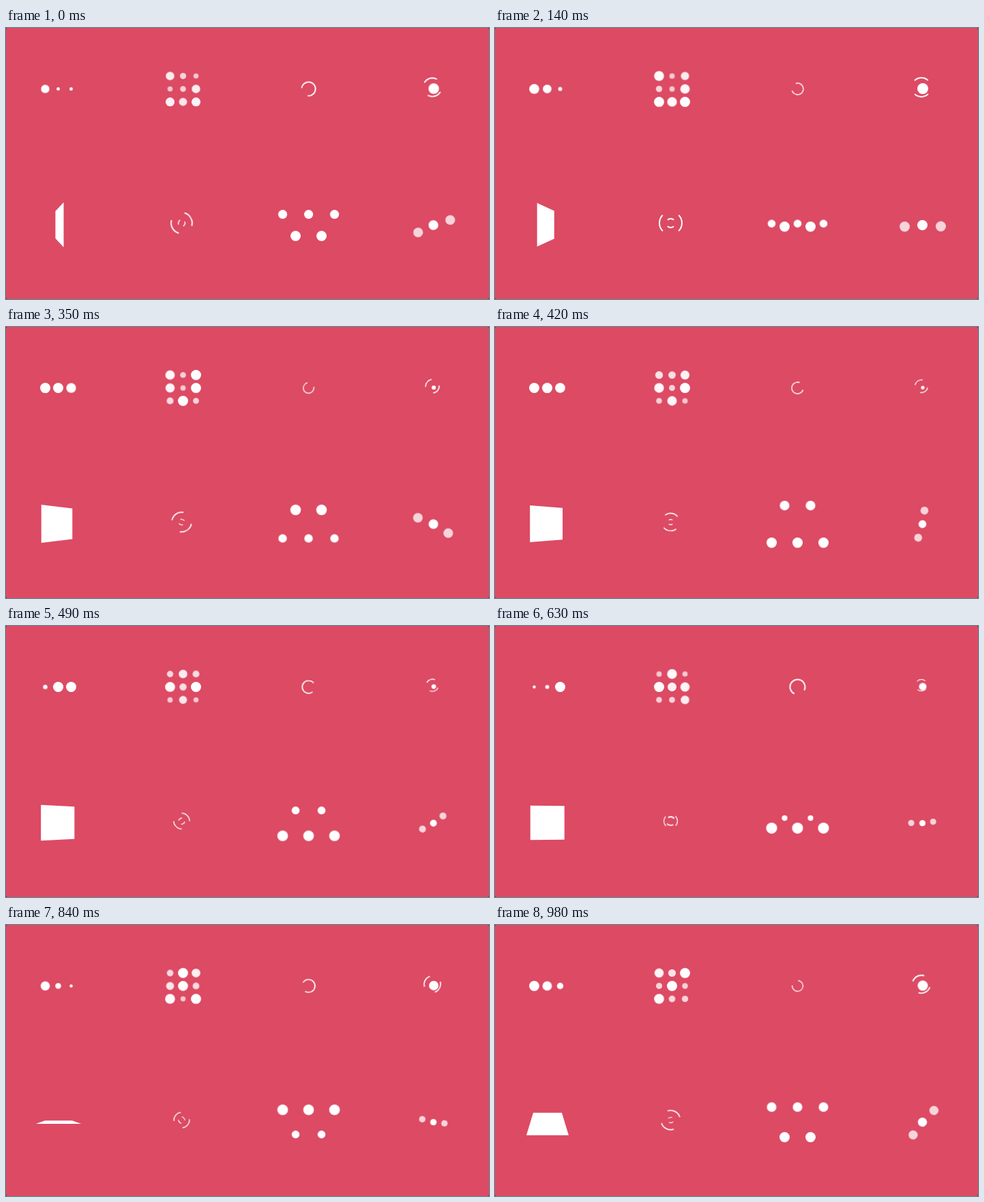
Animation of 708x398 px, one loop 1050 ms. Source, as an HTML page:

```html
<!DOCTYPE html>
<html lang="en">
<head>
<meta charset="utf-8">
<title>Loaders</title>
<style>
html, body { margin: 0; width: 100%; height: 100%; overflow: hidden; background: #3a2228; }
#stage { position: relative; width: 708px; height: 398px; overflow: hidden; border-radius: 2px; background: #dc4a64; }
#stage div { position: absolute; box-sizing: border-box; animation: 1s infinite paused; }
.dot { border-radius: 50%; background: #fff; }
.square { background: #fff; }
.ring { border: 2px solid #fff; border-radius: 50%; }
.open { border-bottom-color: transparent; }
.caps { border-color: #fff transparent; }
.sides { border-color: transparent #fff; }
.trio::before, .trio::after {
  content: ""; position: absolute; top: 2px; width: 15px; height: 15px;
  border-radius: 50%; background: #fff; opacity: .76;
}
.trio::before { left: -26px; }
.trio::after { left: 27px; }

@keyframes pulse {
  0%, 100% { transform: scale(1); }
  30% { transform: scale(.3); }
}
@keyframes grid {
  0%, 100% { transform: scale(1); opacity: 1; }
  50% { transform: scale(.5); opacity: .7; }
}
@keyframes spin {
  0% { transform: rotate(0deg) scale(1); }
  50% { transform: rotate(180deg) scale(.6); }
  100% { transform: rotate(360deg) scale(1); }
}
@keyframes flip {
  0% { transform: perspective(100px) rotateX(0deg) rotateY(0deg); }
  25% { transform: perspective(100px) rotateX(180deg) rotateY(0deg); }
  50% { transform: perspective(100px) rotateX(180deg) rotateY(180deg); }
  75% { transform: perspective(100px) rotateX(0deg) rotateY(180deg); }
  100% { transform: perspective(100px) rotateX(0deg) rotateY(0deg); }
}
@keyframes rise-even {
  0% { transform: translateY(0) scale(1.1); }
  25% { transform: translateY(-30px) scale(1); }
  50% { transform: translateY(0) scale(.4); }
  75% { transform: translateY(30px) scale(1); }
  100% { transform: translateY(0) scale(1); }
}
@keyframes rise-odd {
  0% { transform: translateY(0) scale(.4); }
  25% { transform: translateY(30px) scale(1); }
  50% { transform: translateY(0) scale(1.1); }
  75% { transform: translateY(-30px) scale(1); }
  100% { transform: translateY(0) scale(.75); }
}
</style>
</head>
<body>
<div id="stage"></div>
<script>
const STEP = 70, STEPS = 15, FPS = 15, START = 860;
const stage = document.getElementById('stage');
const BACK = 'cubic-bezier(.2,.68,.18,1.08)';
const SOFT = 'cubic-bezier(.09,.57,.49,.9)';
const RISE = 'cubic-bezier(.15,.46,.9,.6)';
const SWING = 'cubic-bezier(.7,-.13,.22,.86)';

// x, y is the centre; phase is how far the motion has run when the loop begins
function add(cls, x, y, size, name, ms, ease, phase = START, direction = 'normal') {
  const el = document.createElement('div');
  el.className = cls;
  Object.assign(el.style, {
    left: x - size / 2 + 'px', top: y - size / 2 + 'px',
    width: size + 'px', height: size + 'px',
    animationName: name, animationDuration: ms + 'ms',
    animationTimingFunction: ease, animationDelay: -phase + 'ms',
    animationDirection: direction
  });
  stage.append(el);
}

for (let i = 0; i < 3; i++)
  add('dot', 57.5 + 19 * i, 89.5, 15, 'pulse', 750, BACK, START + 240 - 120 * i);

// duration and phase of each grid dot
[[880, 608], [1020, 243], [650, 308],
 [1220, 583], [1380, 393], [1560, 1075],
 [716, 519], [1000, 665], [620, 450]].forEach(([ms, phase], i) =>
  add('dot', 240.5 + 19 * (i % 3), 70.5 + 19 * Math.floor(i / 3), 15, 'grid', ms, 'ease', phase));

add('ring open', 443, 89, 25, 'spin', 750, 'linear');

add('dot', 627, 89, 16, 'pulse', 1000, SOFT);
add('ring caps', 625, 87, 30, 'spin', 1000, SOFT);

add('square', 76.75, 289, 50, 'flip', 3000, SOFT);

add('ring sides', 257.5, 286.5, 35, 'spin', 1000, 'ease-in-out');
add('ring caps', 257.5, 286.5, 15, 'spin', 500, 'ease-in-out', START, 'reverse');

for (let i = 0; i < 5; i++)
  add('dot', 405.5 + 19 * i, 289.5, 15, i % 2 ? 'rise-even' : 'rise-odd', 1000, RISE);

add('dot trio', 626.5, 289.5, 15, 'spin', 1000, SWING);

const motions = document.getAnimations();
let shown = -1;
function draw() {
  const step = Math.floor(performance.now() / STEP) % STEPS;
  if (step !== shown) {
    shown = step;
    for (const m of motions) m.currentTime = step * 1000 / FPS;
  }
  requestAnimationFrame(draw);
}
draw();
</script>
</body>
</html>
```
